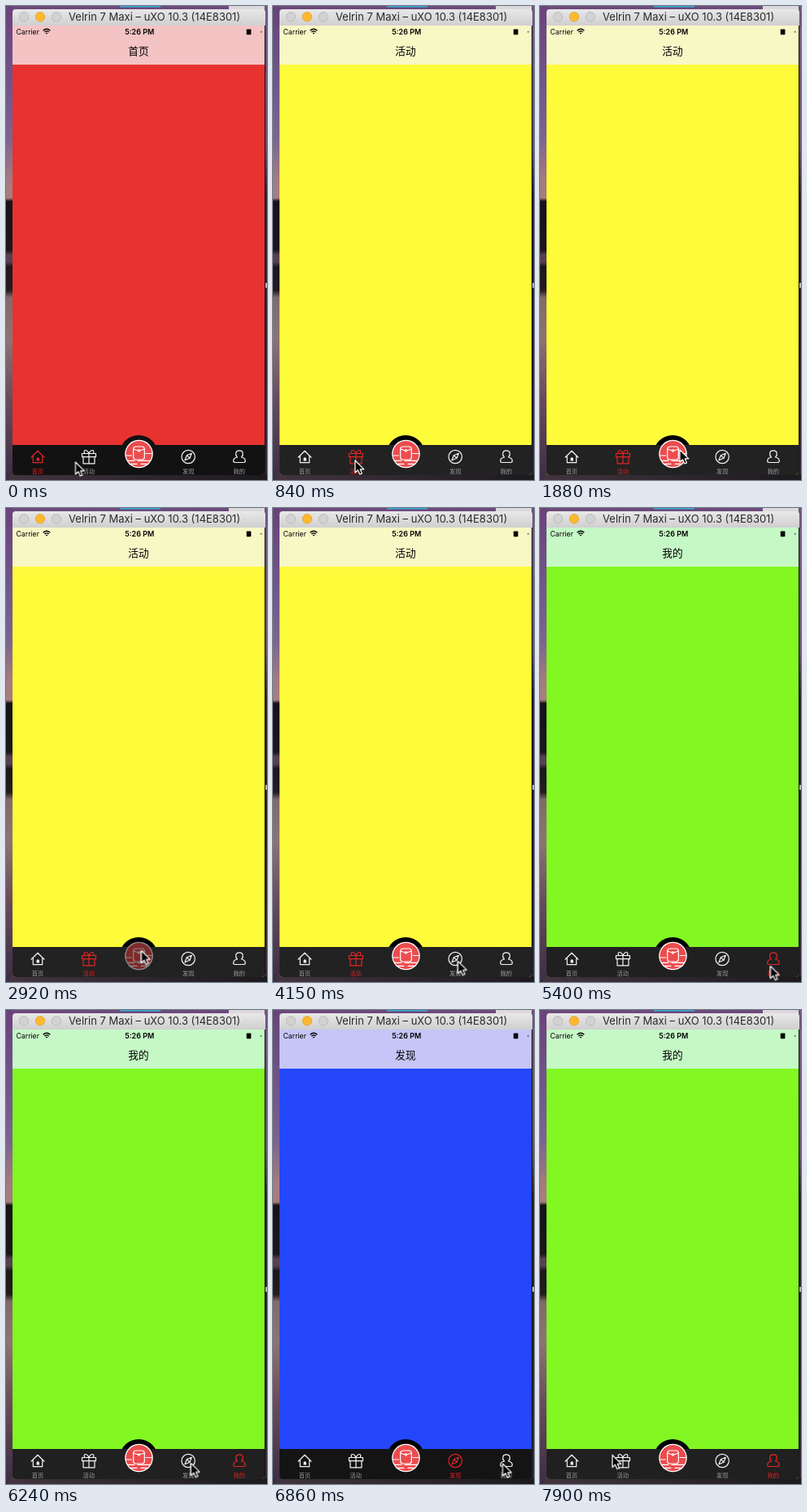
These frames come from a looping animation (321x582 px, 8 s). An HTML page:

```html
<!DOCTYPE html>
<html lang="zh">
<head>
<meta charset="utf-8">
<title>Tab bar demo</title>
<style>
  html, body { margin: 0; width: 100%; height: 100%; overflow: hidden; background: #3b2d42; }
  svg { display: block; width: 321px; height: 582px; }
  text { font-family: Inter, "Noto Sans CJK SC", "Noto Sans CJK", sans-serif; }

  .home, .gift, .find, .me, .cursor, .shade { animation: 8s step-end infinite; }
  .home { --on: 1; animation-name: home; }
  .gift { --on: 0; animation-name: gift; }
  .find { --on: 0; animation-name: find; }
  .me { --on: 0; animation-name: me; }
  .cursor { animation-name: move; }
  .shade { opacity: 0; animation-name: press; }

  .scene { opacity: var(--on); }
  .heading { font: 500 12.7px "Noto Sans CJK SC", "Noto Sans CJK", sans-serif; text-anchor: middle; }
  .tab { --red: calc(var(--on) * 100%); }
  .icon { fill: none; stroke: color-mix(in srgb, #e32525 var(--red), #f4f4f4); stroke-width: 1.2; stroke-linejoin: round; stroke-linecap: round; }
  .solid { fill: color-mix(in srgb, #e32525 var(--red), #f4f4f4); stroke: none; }
  .label { font: 7.3px "Noto Sans CJK SC", "Noto Sans CJK", sans-serif; text-anchor: middle; fill: color-mix(in srgb, #dc2222 var(--red), #9b9b9b); }

  @keyframes home { 0% { --on: 1 } 10.5%, 100% { --on: 0 } }
  @keyframes gift { 0% { --on: 0 } 10.5% { --on: 1 } 57.125%, 100% { --on: 0 } }
  @keyframes find {
    0% { --on: 0 } 57.125% { --on: 1 } 67.5% { --on: 0 }
    80.625% { --on: 1 } 91%, 100% { --on: 0 }
  }
  @keyframes me {
    0% { --on: 0 } 67.5% { --on: 1 } 80.625% { --on: 0 } 91%, 100% { --on: 1 }
  }
  @keyframes press {
    0% { opacity: 0 } 26.125% { opacity: .46 } 31.25% { opacity: 0 }
    36.5% { opacity: .46 } 39%, 100% { opacity: 0 }
  }
  @keyframes move {
    0% { transform: translate(85.5px, 560px) }
    2.625% { transform: translate(95px, 560px) }
    5.25% { transform: translate(101px, 558px) }
    15.75% { transform: translate(108px, 558px) }
    18.375% { transform: translate(131px, 555px) }
    21% { transform: translate(160px, 550px) }
    23.5% { transform: translate(172px, 545px) }
    26.125% { transform: translate(166.5px, 543.5px) }
    41.625% { transform: translate(178px, 553px) }
    44.25% { transform: translate(203px, 564px) }
    46.75% { transform: translate(228px, 564px) }
    49.375% { transform: translate(231px, 559px) }
    51.875% { transform: translate(227.5px, 556.5px) }
    59.75% { transform: translate(244px, 564px) }
    62.25% { transform: translate(283.5px, 562.5px) }
    70.125% { transform: translate(281px, 563px) }
    72.75% { transform: translate(262px, 563px) }
    75.375% { transform: translate(240px, 560px) }
    78% { transform: translate(227.5px, 556.5px) }
    85.75% { transform: translate(282.5px, 557px) }
    93.625% { transform: translate(236px, 559px) }
    96.25% { transform: translate(145px, 552px) }
    98.75%, 100% { transform: translate(89px, 546.5px) }
  }
</style>
</head>
<body>
<svg viewBox="0 0 321 582">
  <defs>
    <linearGradient id="desk" x2="0" y2="1">
      <stop stop-color="#69437a"/>
      <stop offset=".2" stop-color="#735a8e"/>
      <stop offset=".28" stop-color="#7d6490"/>
      <stop offset=".36" stop-color="#a27a80"/>
      <stop offset=".405" stop-color="#a87e80"/>
      <stop offset=".412" stop-color="#17131a"/>
      <stop offset=".515" stop-color="#1b171c"/>
      <stop offset=".525" stop-color="#57404f"/>
      <stop offset=".54" stop-color="#57404f"/>
      <stop offset=".55" stop-color="#1c171b"/>
      <stop offset=".6" stop-color="#241c20"/>
      <stop offset=".615" stop-color="#836969"/>
      <stop offset=".7" stop-color="#8f7374"/>
      <stop offset=".83" stop-color="#6a4b5b"/>
      <stop offset="1" stop-color="#3c2d44"/>
    </linearGradient>
    <linearGradient id="edge" x2="0" y2="1">
      <stop stop-color="#6f5480"/>
      <stop offset=".3" stop-color="#62506f"/>
      <stop offset=".4" stop-color="#2a232d"/>
      <stop offset=".7" stop-color="#2b2229"/>
      <stop offset="1" stop-color="#35293c"/>
    </linearGradient>
    <linearGradient id="floor">
      <stop stop-color="#43343f"/>
      <stop offset="1" stop-color="#1c1a1e"/>
    </linearGradient>
    <linearGradient id="chrome" x2="0" y2="1">
      <stop stop-color="#e9e8e9"/>
      <stop offset="1" stop-color="#d0cfd0"/>
    </linearGradient>
    <clipPath id="screen"><path d="M8 24H318V572Q318 576 314 576H12Q8 576 8 572Z"/></clipPath>
    <clipPath id="disc"><circle cx="163.5" cy="550" r="16.5"/></clipPath>
  </defs>

  <!-- desktop -->
  <rect width="321" height="582" fill="url(#desk)"/>
  <rect x="318" width="3" height="582" fill="url(#edge)"/>
  <rect x="318" y="24" width="1" height="552" fill="#17131a"/>
  <rect x="4" y="575" width="317" height="7" fill="url(#floor)"/>
  <rect x="8" width="310" height="5" fill="#6c4a7a"/>
  <rect x="140" width="50" height="1.5" fill="#35a9d8"/>
  <rect x="274" width="44" height="5" fill="#dcd9dd"/>
  <rect x="319" y="340" width="2" height="6" fill="#b9b4ba"/>

  <!-- window title bar -->
  <path d="M8 24V8Q8 4 12 4H315Q319 4 319 8V24Z" fill="url(#chrome)"/>
  <g stroke-width=".8" fill="#d3d2d3" stroke="#b5b4b5">
    <circle cx="22" cy="13.3" r="5.7"/>
    <circle cx="42" cy="13.3" r="5.7" fill="#fcb92f" stroke="#e0a02a"/>
    <circle cx="62" cy="13.3" r="5.7"/>
  </g>
  <text x="77" y="18" font-size="13" fill="#2b2a2b">Velrin 7 Maxi – uXO 10.3 (14E8301)</text>

  <!-- pages -->
  <g clip-path="url(#screen)">
    <g class="home scene">
      <path d="M8 24H318V576H8Z" fill="#e83230"/>
      <path d="M8 24H318V72H8Z" fill="#f4c3c4"/>
      <circle cx="163.2" cy="550.5" r="23.6" fill="#111"/>
      <path d="M8 539H318V576H8Z" fill="#121212"/>
      <text class="heading" x="163" y="60.2">首页</text>
    </g>
    <g class="gift scene">
      <path d="M8 24H318V576H8Z" fill="#fefb3a"/>
      <path d="M8 24H318V72H8Z" fill="#f8f8c5"/>
      <circle cx="163.2" cy="550.5" r="23.6"/>
      <path d="M8 539H318V576H8Z" fill="#222"/>
      <text class="heading" x="163" y="60.2">活动</text>
    </g>
    <g class="find scene">
      <path d="M8 24H318V576H8Z" fill="#2447fc"/>
      <path d="M8 24H318V72H8Z" fill="#c5c5f7"/>
      <circle cx="163.2" cy="550.5" r="23.6"/>
      <path d="M8 539H318V576H8Z" fill="#141414"/>
      <text class="heading" x="163" y="60.2">发现</text>
    </g>
    <g class="me scene">
      <path d="M8 24H318V576H8Z" fill="#82f722"/>
      <path d="M8 24H318V72H8Z" fill="#c6f8c6"/>
      <circle cx="163.2" cy="550.5" r="23.6"/>
      <path d="M8 539H318V576H8Z" fill="#202020"/>
      <text class="heading" x="163" y="60.2">我的</text>
    </g>
  </g>

  <!-- status bar -->
  <text x="12.5" y="35" font-size="8.7">Carrier</text>
  <g fill="none" stroke="#000" stroke-width="1.3">
    <path d="M45.6 30.2Q50 26.3 54.4 30.2M47.3 32.1Q50 29.8 52.7 32.1"/>
    <path d="M48.6 33.2L50 34.8L51.4 33.2Q50 32.2 48.6 33.2Z" fill="#000" stroke="none"/>
  </g>
  <text x="164.3" y="35" font-size="9" font-weight="600" text-anchor="middle">5:26 PM</text>
  <rect x="295.8" y="28.4" width="5.6" height="6.8" rx=".8"/>
  <rect x="313" y="31" width="1.5" height="1.5" fill="#444"/>

  <!-- tabs -->
  <g class="home tab">
    <path class="icon" d="M31 554.2L39 546.3L47 554.2M33.3 553V560.7H44.7V553"/>
    <path class="solid" d="M37.6 557.5V555.5Q39.3 553 41 555.5V558.6H37.6Z"/>
    <text class="label" x="39" y="573.6">首页</text>
  </g>
  <g class="gift tab">
    <path class="icon" d="M93.5 549.5H110.5V553.6H93.5ZM95 553.6V561.8H109V553.6M102 549.5V561.8M102 549.3C99 543.5 94.5 545 96.7 549.3M102 549.3C105 543.5 109.5 545 107.3 549.3"/>
    <text class="label" x="101.8" y="573.6">活动</text>
  </g>
  <g class="find tab">
    <circle class="icon" cx="224.2" cy="553.5" r="8.2"/>
    <path class="icon" d="M228.3 549.3L226 555.3L220 557.8L222.4 551.7ZM222.4 551.7L226 555.3"/>
    <text class="label" x="224.2" y="573.6">发现</text>
  </g>
  <g class="me tab">
    <path class="icon" d="M284.4 554C281.3 550.5 282.3 545.8 287 545.8S292.7 550.5 289.6 554C292.5 554.6 294.3 556.4 294.3 558.6Q294.3 560.5 292.2 560.5H281.8Q279.7 560.5 279.7 558.6C279.7 556.4 281.5 554.6 284.4 554"/>
    <text class="label" x="286.7" y="573.6">我的</text>
  </g>

  <!-- centre button -->
  <circle cx="163.5" cy="550" r="17.3" fill="#fff"/>
  <circle cx="163.5" cy="550" r="16" fill="#ec4c4e"/>
  <g clip-path="url(#disc)" fill="none" stroke="#fff" stroke-width="1.2" stroke-linecap="round">
    <path d="M146 552H154.5M172 549.5H181M146 558.3H158M162 558.3H181M151 562.3H161M166 562.3H174"/>
    <path d="M160 541H167Q170.3 541 170.3 544.3V554Q170.3 557 167.3 557H159.7Q156.7 557 156.7 554V544.3Q156.7 541 160 541Z" fill="#ec4c4e"/>
    <path d="M157 544Q163.5 547.5 170 544"/>
    <circle cx="163.5" cy="546" r="1.2" fill="#ec4c4e"/>
  </g>
  <circle class="shade" cx="163.5" cy="550" r="17.4"/>

  <g class="cursor">
    <path d="M0 0V15L3.5 11.8L5.8 17L8.5 15.9L6.2 10.8H10.8Z" stroke="#fff" stroke-width="1.2" stroke-linejoin="round"/>
  </g>
</svg>
</body>
</html>
```
